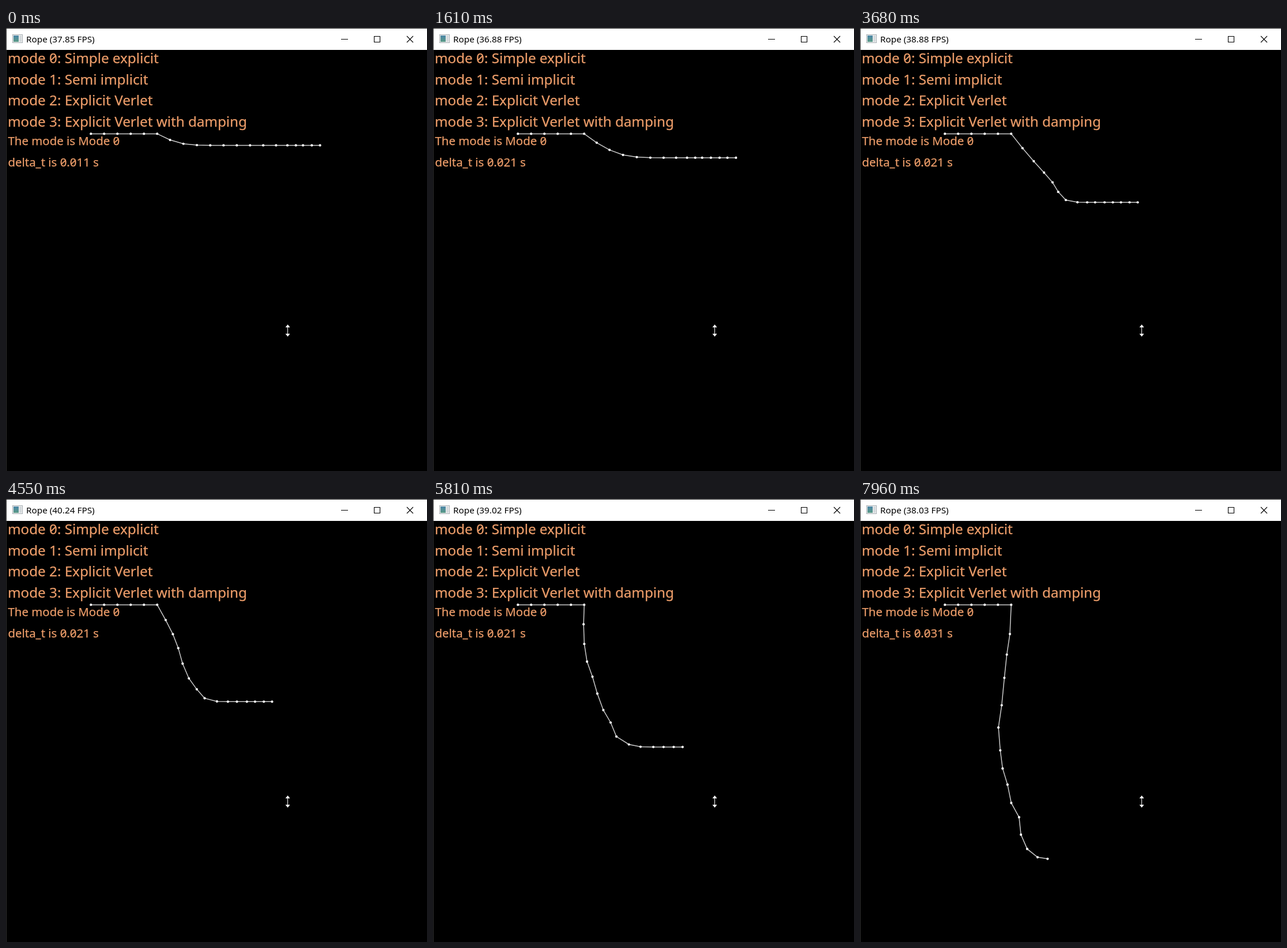
These frames come from a looping animation (730x768 px, 8 s). An HTML page:

```html
<!DOCTYPE html>
<html lang="en">
<head>
<meta charset="utf-8">
<title>Rope</title>
<style>
  html, body { margin: 0; width: 100%; height: 100%; overflow: hidden; background: #000; }
  svg { display: block; width: 730px; height: 768px; }
  text { font-family: "Noto Sans", "Open Sans", sans-serif; white-space: pre; }
  .caption { font-size: 15.3px; fill: #000; }
  .modes, .status { fill: #eb9c69; stroke: #eb9c69; stroke-width: 0.25; font-feature-settings: "zero"; }
  .modes { font-size: 24.2px; }
  .status { font-size: 20.4px; }
  .buttons { fill: none; stroke: #000; stroke-width: 1.1; }
  #rope { fill: none; stroke: #c9c9c9; stroke-width: 1.5; marker: url(#dot); }
</style>
</head>
<body>
<svg viewBox="0 0 730 768">
  <defs>
    <marker id="dot" markerUnits="userSpaceOnUse" markerWidth="6" markerHeight="6" refX="3" refY="3">
      <circle cx="3" cy="3" r="2.1" fill="#fff"/>
    </marker>
    <linearGradient id="pane" x2="0" y2="1">
      <stop stop-color="#4b86a8"/><stop offset="1" stop-color="#5b9a86"/>
    </linearGradient>
  </defs>

  <rect width="730" height="768" fill="#000"/>
  <rect width="1" height="768" fill="#303030"/>
  <rect width="730" height="1" fill="#222"/>
  <rect x="1" y="1" width="729" height="37" fill="#fff"/>

  <g>
    <rect x="11.5" y="11.5" width="17" height="14" fill="#f2f2f2" stroke="#a5adb2"/>
    <rect x="13" y="13" width="9" height="11" fill="url(#pane)"/>
    <rect x="23" y="13" width="4" height="11" fill="#d5dadd"/>
  </g>
  <text class="caption" id="caption" x="35" y="25"></text>
  <path class="buttons" d="M581 19.5h12M638.5 14.5h10v10h-10zM695 14l11 11M706 14l-11 11"/>

  <g class="modes">
    <text x="3" y="61">mode 0: Simple explicit</text>
    <text x="3" y="97.5">mode 1: Semi implicit</text>
    <text x="3" y="134">mode 2: Explicit Verlet</text>
    <text x="3" y="170.5">mode 3: Explicit Verlet with damping</text>
  </g>
  <g class="status">
    <text x="3.5" y="203">The mode is Mode 0</text>
    <text id="delta" x="3.5" y="239.5"></text>
  </g>

  <polyline id="rope"/>
  <path fill="#fff" d="M488.5 514l4 5h-3.5v11h3.5l-4 5-4-5h3.5v-11h-3.5z"/>
</svg>

<script>
const LOOP = 8000, FRAME = 77.28, FRAMES = 104, STEPS = 3;
const NODES = 20, PINNED = 6, LEFT = 147.2, TOP = 183.4, SPACING = 23;
const REST = 14.4, STIFFNESS = 9.61, GRAVITY = 14.83;   // pixels and seconds, unit mass
const WARM_UP = 150;                                    // steps before the loop begins

const timeStep = frame => frame > 97 ? 0.031 : frame > 20 ? 0.021 : 0.011;

// Pull of a spring on node a towards node b
function pull(a, b) {
  const dx = b.x - a.x, dy = b.y - a.y, length = Math.hypot(dx, dy);
  const force = STIFFNESS * (length - REST) / length;
  return [force * dx, force * dy];
}

// Explicit Euler: positions and velocities both advance from the old state
function advance(nodes, dt) {
  return nodes.map((node, i) => {
    if (i < PINNED) return node;
    let ax = 0, ay = GRAVITY;
    for (const other of [nodes[i - 1], nodes[i + 1]]) {
      if (!other) continue;
      const [fx, fy] = pull(node, other);
      ax += fx;
      ay += fy;
    }
    return {
      x: node.x + node.vx * dt, y: node.y + node.vy * dt,
      vx: node.vx + ax * dt, vy: node.vy + ay * dt
    };
  });
}

function simulate() {
  let nodes = Array.from({ length: NODES }, (_, i) => ({ x: LEFT + SPACING * i, y: TOP, vx: 0, vy: 0 }));
  for (let i = 0; i < WARM_UP; i++) nodes = advance(nodes, timeStep(0));
  const shapes = [];
  for (let frame = 1; frame <= FRAMES; frame++) {
    shapes.push(nodes.map(p => `${p.x.toFixed(2)},${p.y.toFixed(2)}`).join(" "));
    for (let i = 0; i < STEPS; i++) nodes = advance(nodes, timeStep(frame));
  }
  return shapes;
}

// Frame rate readings at a few half seconds, the rest lie between them
const readings = [[0, 37.85], [3, 36.88], [6, 38.2], [9, 40.24], [12, 39.02], [14, 39.46], [16, 38.03]];

function frameRate(t) {
  const tick = Math.round(t / 500);
  const next = Math.max(1, readings.findIndex(([at]) => at >= tick));
  const [[a, from], [b, to]] = readings.slice(next - 1, next + 1);
  return from + (to - from) * (tick - a) / (b - a);
}

const [caption, delta, rope] = ["caption", "delta", "rope"].map(id => document.getElementById(id));
const shapes = simulate();

function draw(now) {
  const t = now % LOOP;
  const frame = Math.floor((t + 24) / FRAME);
  rope.setAttribute("points", shapes[frame]);
  caption.textContent = `Rope (${frameRate(t).toFixed(2)} FPS)`;
  delta.textContent = `delta_t is ${timeStep(frame).toFixed(3)} s`;
}

const start = performance.now();
(function tick() {
  draw(performance.now() - start);
  requestAnimationFrame(tick);
})();
</script>
</body>
</html>
```
